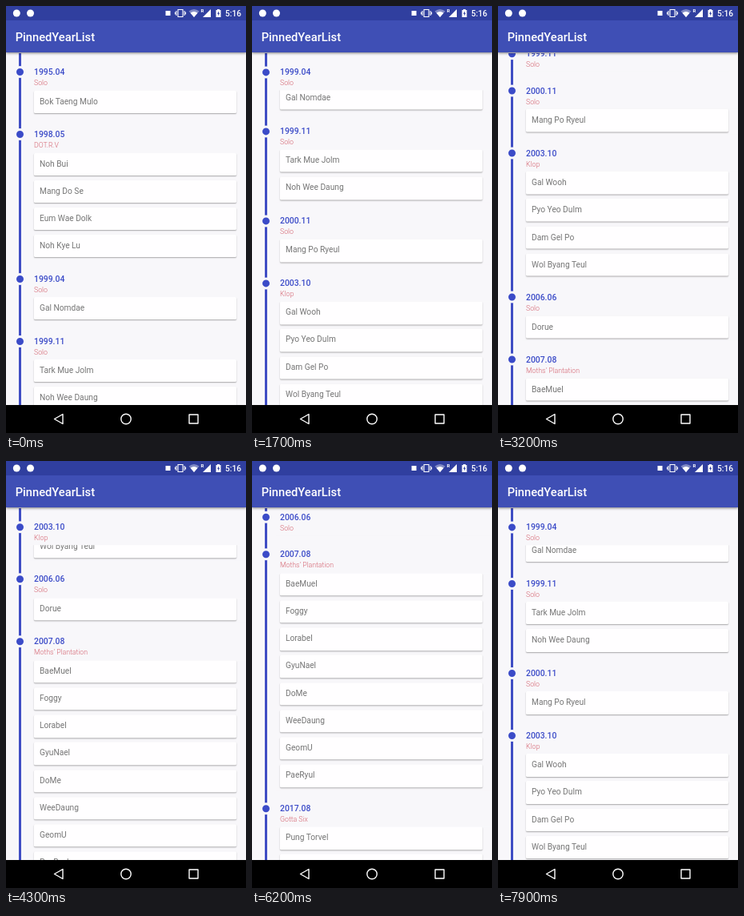
An HTML page for the animation above (8 s loop, 300 by 534 pixels).

```html
<!DOCTYPE html>
<html lang="en">
<head>
<meta charset="utf-8">
<title>Timeline</title>
<style>
  html, body { margin: 0; width: 100%; height: 100%; overflow: hidden; background: #f8f7fa; }
  body { position: relative; font-family: Roboto, sans-serif; }
  div, svg { position: absolute; white-space: nowrap; }
  #view { left: 0; top: 59px; width: 300px; height: 440px; overflow: hidden; }
  #line { left: 16px; top: 0; width: 3px; height: 100%; background: #3f4dc4; }
  #list, .section { left: 0; top: 0; width: 300px; }
  .head { left: 0; top: 0; width: 300px; height: 46.5px; z-index: 1; }
  .head .fill { left: 30px; right: 0; top: 0; bottom: 0; background: #f8f7fa; }
  .dot { left: 10px; top: 16px; width: 9px; height: 9px; border: 3px solid #f8f7fa;
    border-radius: 50%; background: #3b4bc8; }
  .date { left: 35px; top: 16px; font: 500 10.4px/16px Roboto, sans-serif; color: #3b4bc8; }
  .group { left: 35px; top: 30px; font: 300 8.75px/14px Roboto, sans-serif; color: #d4626f; }
  .card { left: 35px; width: 246px; height: 28.4px; padding-left: 7px; border-radius: 1.5px;
    background: #fffeff; box-shadow: 0 1px 1.5px rgba(0,0,0,.32);
    font-size: 10.2px; line-height: 28.6px; color: #757575; }
  #bar { left: 0; top: 0; width: 300px; height: 58px; background: #3f4fb5;
    box-shadow: 0 1px 3px rgba(0,0,0,.5); }
  #status { left: 0; top: 0; width: 300px; height: 17.5px; background: #303f9f; }
  #title { left: 11.7px; top: 29px; font: 500 14.7px/21px Roboto, sans-serif; color: #fff; }
  #clock { left: 274px; top: 3px; font: 500 10.2px/14px Roboto, sans-serif; color: #fff; }
  #nav { left: 0; top: 499px; width: 300px; height: 35px; background: #000; }
</style>
</head>
<body>
<div id="view"><div id="line"></div><div id="list"></div></div>
<div id="bar">
  <div id="status"></div>
  <svg width="300" height="18" fill="#fff">
    <circle cx="13.3" cy="9" r="4.5"/>
    <circle cx="30.5" cy="9" r="4.5"/>
    <rect x="199.5" y="6" width="6" height="6"/>
    <path d="M215 4.5h6v9h-6zM213 6v6M211.5 7.5v3M223 6v6M224.5 7.5v3" fill="none" stroke="#fff" stroke-width="1.1"/>
    <path d="M228.5 6.5Q235 1.5 241.5 6.5L235 14z" opacity=".4"/>
    <path d="M230.5 8.7Q235 5.5 239.5 8.7L235 14z"/>
    <path d="M256 4v10h-10z"/>
    <text x="243.5" y="8" font-size="6" font-weight="700">R</text>
    <path d="M262.5 5h1.5V4h3v1h1.5v9h-6z"/>
    <path d="M266 6.5l-2 3.2h1.2v2.5l2-3.5H266z" fill="#303f9f"/>
  </svg>
  <div id="clock">5:16</div>
  <div id="title">PinnedYearList</div>
</div>
<div id="nav">
  <svg width="300" height="35" fill="none" stroke="#fff" stroke-width="1.4" stroke-linejoin="round">
    <path d="M60.5 17.5L71 11.5v12z"/>
    <circle cx="150" cy="17.5" r="6.2"/>
    <rect x="229" y="12" width="11" height="11"/>
  </svg>
</div>
<script>
const HEAD = 46.5, PITCH = 34.2, FIRST = 78, LOOP = 8000;

const groups = [
  ['1995.04', 'Solo', 'Bok Taeng Mulo'],
  ['1998.05', 'DOT.R.V', 'Noh Bui', 'Mang Do Se', 'Eum Wae Dolk', 'Noh Kye Lu'],
  ['1999.04', 'Solo', 'Gal Nomdae'],
  ['1999.11', 'Solo', 'Tark Mue Jolm', 'Noh Wee Daung'],
  ['2000.11', 'Solo', 'Mang Po Ryeul'],
  ['2003.10', 'Klop', 'Gal Wooh', 'Pyo Yeo Dulm', 'Dam Gel Po', 'Wol Byang Teul'],
  ['2006.06', 'Solo', 'Dorue'],
  ['2007.08', "Moths' Plantation", 'BaeMuel', 'Foggy', 'Lorabel', 'GyuNael', 'DoMe',
    'WeeDaung', 'GeomU', 'PaeRyul'],
  ['2017.08', 'Gotta Six', 'Pung Torvel', 'Tark Jomul']
];

// [time, scroll offset]
const keys = [[0, 0], [300, 0], [1700, 262.6], [2600, 400], [2800, 400], [3200, 425.5],
  [4300, 641.8], [5400, 765], [6100, 765], [6200, 750.7], [6900, 505.8], [7900, 266], [LOOP, 266]];

const list = document.getElementById('list');

function add(parent, cls, text = '') {
  const el = document.createElement('div');
  el.className = cls;
  el.textContent = text;
  return parent.appendChild(el);
}

let end = 0;
const sections = groups.map(([date, group, ...names]) => {
  const top = end, height = FIRST + (names.length - 1) * PITCH;
  const section = add(list, 'section');
  section.style.top = top + 'px';
  names.forEach((name, i) => {
    add(section, 'card', name).style.top = HEAD + i * PITCH + 'px';
  });
  const head = add(section, 'head');
  add(head, 'fill');
  add(head, 'dot');
  add(head, 'date', date);
  add(head, 'group', group);
  end += height;
  return { top, height, head };
});

const slope = i => (keys[i + 1][1] - keys[i][1]) / (keys[i + 1][0] - keys[i][0]);

// Harmonic mean of the neighbouring slopes keeps the curve monotone.
function tangent(i) {
  if (i === 0 || i === keys.length - 1) return 0;
  const a = slope(i - 1), b = slope(i);
  return a * b > 0 ? 2 * a * b / (a + b) : 0;
}

function scrollAt(t) {
  let i = 0;
  while (i < keys.length - 2 && t >= keys[i + 1][0]) i++;
  const [t0, y0] = keys[i], [t1, y1] = keys[i + 1];
  const d = t1 - t0, u = (t - t0) / d, v = 1 - u;
  return y0 * v * v * (1 + 2 * u) + y1 * u * u * (3 - 2 * u)
    + d * u * v * (v * tangent(i) - u * tangent(i + 1));
}

function draw(now) {
  const y = scrollAt(Math.floor(now % LOOP / 100) * 100);
  list.style.transform = `translateY(${-y}px)`;
  for (const { top, height, head } of sections) {
    const shift = Math.max(0, Math.min(y - top, height - HEAD));
    head.style.transform = `translateY(${shift}px)`;
  }
}

const start = performance.now();
function tick() {
  draw(performance.now() - start);
  requestAnimationFrame(tick);
}
tick();
</script>
</body>
</html>
```
